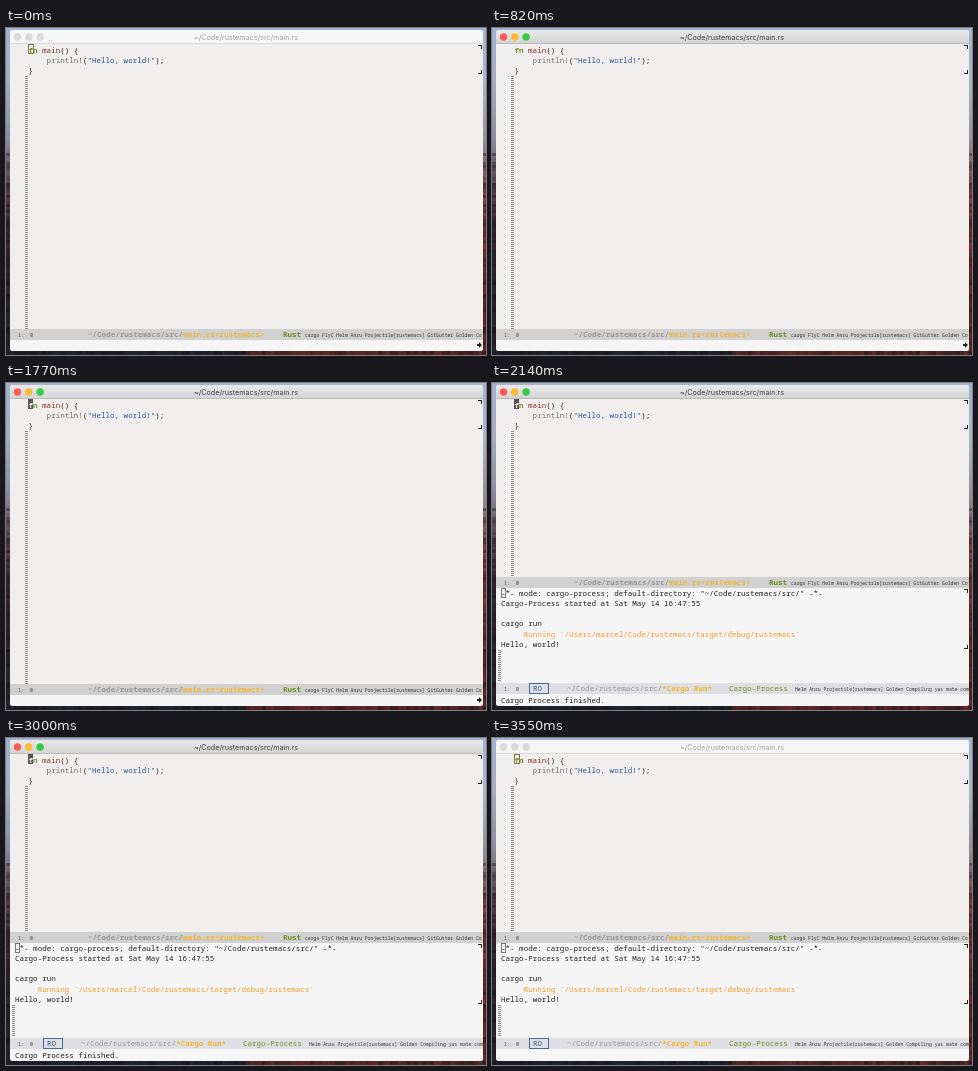
An HTML page with a canvas that plays this animation: 480x327 px, repeating every 3.6 s.

```html
<!DOCTYPE html>
<html lang="en">
<head>
<meta charset="utf-8">
<title>Editor session</title>
<style>
  html, body { margin: 0; height: 100%; overflow: hidden; }
  canvas { display: block; }
</style>
</head>
<body>
<canvas id="stage" width="480" height="327"></canvas>
<script>
const ctx = document.getElementById('stage').getContext('2d');
const LOOP = 3600, FOCUS = 310, SPLIT = 1780, BLUR = 3400, BLINK = 500;
const CHAR = 4.53, LINE = 10.2;
const MONO = '"Noto Sans Mono", monospace';
const INK = '#222', GREEN = '#6f9020', ORANGE = '#f2b632', GREY = '#979797';

function rect(x, y, w, h, color) {
  ctx.fillStyle = color;
  ctx.fillRect(x, y, w, h);
}

function frame(x, y, w, h, color) {
  ctx.strokeStyle = color;
  ctx.lineWidth = 1;
  ctx.strokeRect(x + .5, y + .5, w - 1, h - 1);
}

function gradient(y0, y1, ...colors) {
  const g = ctx.createLinearGradient(0, y0, 0, y1);
  colors.forEach((c, i) => g.addColorStop(i / (colors.length - 1), c));
  return g;
}

function text(str, x, y, color, size = 7.55, weight = 400) {
  ctx.font = `${weight} ${size}px ${MONO}`;
  ctx.fillStyle = color;
  ctx.fillText(str, x, y);
}

// Draws [text, color, weight] runs on the character grid.
function runs(x, y, ...parts) {
  for (const [str, color, weight] of parts) {
    text(str, x, y, color, 7.55, weight);
    x += str.length * CHAR;
  }
}

// Sky at the top, dark ground on the left, red rock on the right.
function desktop() {
  rect(0, 0, 240, 327, gradient(0, 327, '#a3b3cf', '#a0acc2', '#8b8d9f', '#54404a', '#322a34', '#262730', '#1f252b'));
  rect(240, 0, 240, 327, gradient(0, 327, '#a3b3cf', '#a9b5c9', '#95919d', '#87443e', '#8c352c', '#70291f', '#602a27'));
  const noise = n => Math.abs(Math.sin(n * 12.9898) * 43758.5453) % 1;
  for (let y = 125; y < 327; y += 3) {
    const shade = `rgba(20, 12, 18, ${noise(y) * .55})`;
    rect(0, y, 4, 3, shade);
    rect(477, y, 3, 3, shade);
  }
  for (let x = 4; x < 477; x += 4) rect(x, 323, 4, 4, `rgba(20, 16, 22, ${noise(x) * .55})`);
}

function titleBar(focused) {
  rect(4, 2, 473, 14, focused ? gradient(2, 16, '#e9e9e9', '#d3d3d3') : '#f6f6f6');
  rect(4, 15, 473, 1, focused ? '#b9b9b9' : '#d8d8d8');
  ['#fc5b57', '#fbbb35', '#35cb4b'].forEach((color, i) => {
    ctx.fillStyle = focused ? color : '#d9d9d9';
    ctx.beginPath();
    ctx.arc(11.5 + i * 11.3, 9, 3.7, 0, 7);
    ctx.fill();
  });
  ctx.font = '400 7.2px Inter, sans-serif';
  ctx.textAlign = 'center';
  ctx.fillStyle = focused ? '#3c3c3c' : '#a0a0a0';
  ctx.fillText('~/Code/rustemacs/src/main.rs', 240, 12);
  ctx.textAlign = 'left';
}

function gutter(x, top, bottom) {
  for (let y = top; y < bottom; y += 2) rect(x, y, 3, 1, '#8c8c8c');
}

function bounds(top, bottom) {
  rect(472, top, 4, 1, INK);
  rect(475, top, 1, 4, INK);
  rect(472, bottom, 4, 1, INK);
  rect(475, bottom - 3, 1, 4, INK);
}

function modeLine(y, bg, modes, modesX) {
  rect(4, y, 473, 11, bg);
  text('1:  0', 12, y + 8, '#444', 5);
  text(modes, modesX, y + 8, '#333', 4.75);
}

function codePane(bottom, cursor) {
  rect(4, 16, 473, bottom - 16, '#f0efed');
  if (cursor === 'solid') rect(22, 16, 5, 10, '#555');
  runs(22.5, 24.5, ['f', cursor === 'solid' ? '#eee' : GREEN, 700], ['n', GREEN, 700],
    [' main', '#8b2c24'], ['() {', INK]);
  runs(22.5, 24.5 + LINE, ['    println!', '#707070'], ['(', INK], ['"Hello, world!"', '#2a5599'], [');', INK]);
  text('}', 22.5, 24.5 + 2 * LINE, INK);
  if (cursor === 'hollow') frame(22, 16, 6, 10, '#74783f');
  gutter(19, 48, bottom);
  bounds(17, 45);
  modeLine(bottom, '#d0d0d0', 'cargo FlyC Helm Anzu Projectile[rustemacs] GitGutter Golden Co', 299);
  runs(82, bottom + 8.3, ['~/Code/rustemacs/src/', GREY, 700], ['main.rs<rustemacs>', ORANGE, 700]);
  text('Rust', 277, bottom + 8.3, GREEN, 7.55, 700);
}

function processPane() {
  const lines = [
    '-*- mode: cargo-process; default-directory: "~/Code/rustemacs/src/" -*-',
    'Cargo-Process started at Sat May 14 16:47:55',
    '',
    'cargo run',
    '     Running `/Users/marcel/Code/rustemacs/target/debug/rustemacs`',
    'Hello, world!'
  ];
  lines.forEach((line, i) => text(line, 9, 212.7 + i * LINE, i === 4 ? '#f09a28' : INK));
  frame(9, 205, 5, 10, '#777');
  gutter(6, 267, 299);
  bounds(206, 265);
  modeLine(300, '#dfdfe3', 'Helm Anzu Projectile[rustemacs] Golden Compiling yas mate com', 303);
  frame(37, 300, 20, 11, '#416b9c');
  text('RO', 41, 308.3, '#355f94');
  runs(75, 308.3, ['~/Code/rustemacs/src/', GREY, 500], ['*Cargo Run*', ORANGE, 700]);
  text('Cargo-Process', 237, 308.3, GREEN, 7.55, 500);
}

function continuationArrow() {
  rect(471, 316, 3, 2, INK);
  ctx.beginPath();
  ctx.moveTo(473, 314);
  ctx.lineTo(476, 317);
  ctx.lineTo(473, 320);
  ctx.fill();
}

function draw(t) {
  const focused = t >= FOCUS && t < BLUR;
  const split = t >= SPLIT;
  const phase = Math.floor((t - (split ? SPLIT : FOCUS)) / BLINK);
  const cursor = !focused ? 'hollow' : phase % 2 ? 'none' : 'solid';

  desktop();
  ctx.save();
  ctx.beginPath();
  ctx.roundRect(4, 2, 473, 321, 2.5);
  ctx.clip();
  rect(4, 2, 473, 321, '#f5f5f6');
  titleBar(focused);
  codePane(split ? 194 : 301, cursor);
  if (split) {
    processPane();
    if (focused) text('Cargo Process finished.', 9, 319.7, INK);
  } else {
    continuationArrow();
  }
  ctx.restore();
}

function tick() {
  draw(performance.now() % LOOP);
  requestAnimationFrame(tick);
}
tick();
</script>
</body>
</html>
```
